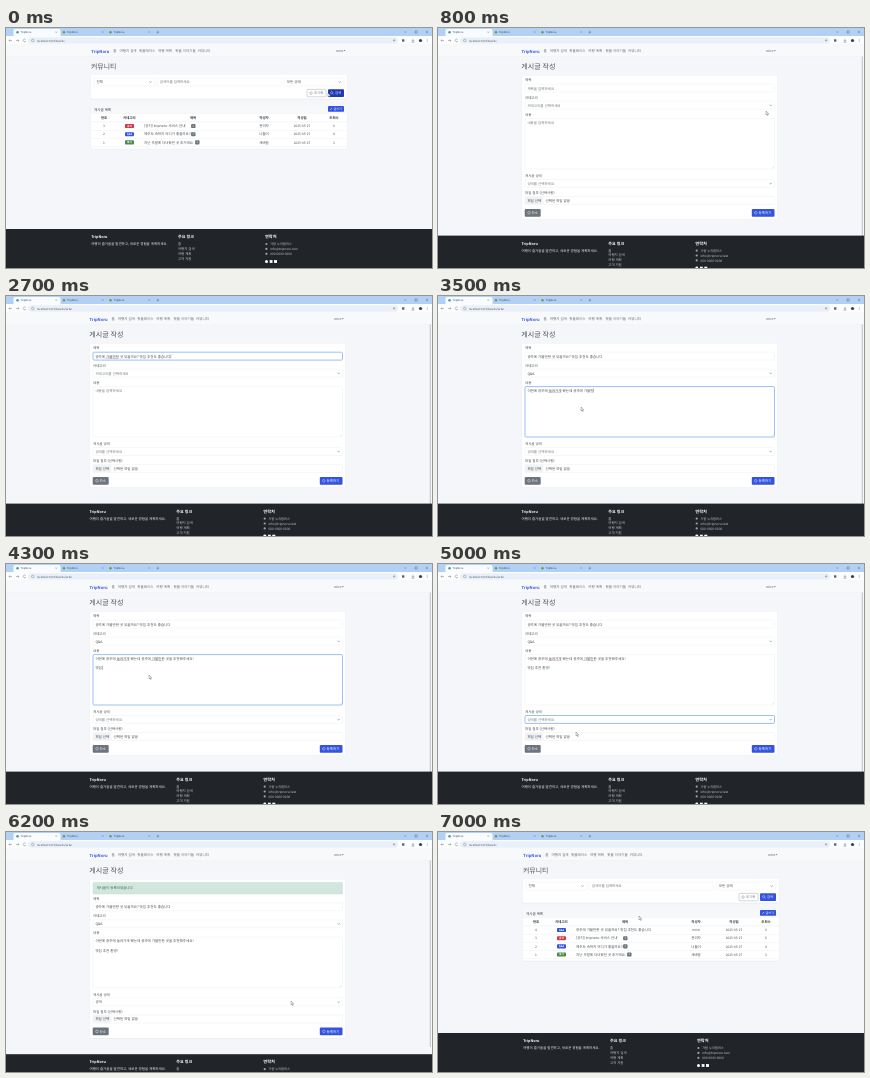
Animation, 426 px wide and 240 px high, one loop 7.1 s. Source, as an HTML page:

```html
<!DOCTYPE html>
<html lang="ko">
<head>
<meta charset="utf-8">
<title>TripNoru</title>
<style>
  html, body { margin: 0; width: 100%; height: 100%; overflow: hidden; background: #f5f6fa; }
  svg { display: block; width: 100vw; height: 100vh; }
  text { font-family: 'Noto Sans CJK KR', 'Noto Sans CJK', 'Noto Sans', sans-serif; text-rendering: geometricPrecision; white-space: pre; }
</style>
</head>
<body>
<svg id="stage" viewBox="0 0 426 240"></svg>
<script>
const LOOP = 7100, STEP = 100;
const BLUE = '#3453de', DARK_BLUE = '#2038b4', INK = '#43484d', GREY = '#6c757d', LINE = '#dfe3e8';
const BRAND = 'TripNoru';
const TITLE = '광주에 가볼만한 곳 있을까요? 맛집 추천도 좋습니다';
const BODY = '이번에 광주에 놀러가게 됐는데 광주에 가볼만한 곳을 추천해주세요!';
const BODY2 = '맛집 추천 환영!';

const rect = (x, y, w, h, fill, more = '') =>
  `<rect x="${x}" y="${y}" width="${w}" height="${h}" fill="${fill}" ${more}/>`;
const text = (x, y, str, size = 3.5, fill = INK, more = '') =>
  `<text x="${x}" y="${y}" font-size="${size}" fill="${fill}" ${more}>${str.replace(/&/g, '&amp;')}</text>`;
const path = (d, stroke, width = .4, more = '') =>
  `<path d="${d}" fill="none" stroke="${stroke}" stroke-width="${width}" ${more}/>`;
const dot = (x, y, r, fill, more = '') => `<circle cx="${x}" cy="${y}" r="${r}" fill="${fill}" ${more}/>`;
const group = (id, inner, more = '') => `<g id="${id}" ${more}>${inner}</g>`;
const MID = 'text-anchor="middle"', BOLD = 'font-weight="700"';

const card = (x, y, w, h) =>
  rect(x - .3, y, w + .6, h + .7, '#000', 'opacity=".05" rx="1.2"') + rect(x, y, w, h, '#fff', 'rx="1"');
const field = (x, y, w, h, id = '') =>
  rect(x, y, w, h, '#fff', `rx="1.1" stroke="${LINE}" stroke-width=".3" ${id && `id="${id}"`}`);
const chevron = (x, y) => path(`M${x - 1.1} ${y - .5}l1.1 1.1l1.1-1.1`, '#454b51', .45);
const lens = (x, y, color) =>
  path(`M${x + .5} ${y + .5}l1 1M${x + .8} ${y - .4}a1.1 1.1 0 1 1-2.2 0a1.1 1.1 0 1 1 2.2 0`, color);
const ring = (x, y, color) => dot(x, y, 1.3, 'none', `stroke="${color}" stroke-width=".4"`);

function browser() {
  const tab = (x, active) =>
    (active ? rect(x - 4, 1, 47, 9, '#f8fbff', 'rx="1.6"') : '') +
    dot(x, 4.2, 1.2, active ? '#4f8f86' : '#6c9b45') +
    text(x + 3, 5.3, BRAND, 2.6, '#3a4450') +
    path(`M${x + 38} 3.4l1.5 1.5m0-1.5l-1.5 1.5`, '#56606c', .3);
  return rect(0, 0, 426, 9, '#b1d0f3') + tab(11.5, true) + tab(58, false) + tab(104.5, false) +
    path('M151.8 2.9v2.6M150.5 4.2h2.6M398 4h2.4M409 2.9h2.2v2.2h-2.2zM419.9 2.9l2.2 2.2m0-2.2l-2.2 2.2', '#3f4a57', .35) +
    rect(0, 8, 426, 9, '#fcfdff') + rect(22, 9.2, 370, 6.5, '#eaf0f9', 'rx="3.2"') +
    path('M6 12.5h-3m1.2-1.2l-1.2 1.2l1.2 1.2M10 12.5h3m-1.2-1.2l1.2 1.2l-1.2 1.2M19.7 11.6a1.4 1.4 0 1 0 .2 1.4', '#596068') +
    ring(26.8, 12.5, '#646c75') +
    text(31, 13.6, 'localhost:5173/boards', 2.65, '#3d444c', 'id="url"') +
    path('M386.8 12.4h2.6M388.1 11.1v2.6', '#667') + rect(396, 11.3, 2.4, 2.4, '#5b6474') +
    path('M407 11v2.3m-1-1l1 1l1-1M405.7 14.2h2.6', '#3f4650') + dot(414.5, 12.5, 1.6, '#35404c') +
    path('M421.3 11v.5M421.3 12.3v.5M421.3 13.6v.5', '#444', .5) +
    rect(0, 16.8, 426, .3, '#dfe5ec');
}

function navbar() {
  const items = [[107.3, '홈'], [113.5, '여행지 검색'], [133, '핫플레이스'], [152, '여행 계획'], [169.3, '핫플 이야기들'], [191.7, '커뮤니티']];
  return rect(0, 17, 426, 11.5, '#f8f9fa') + rect(0, 28.4, 426, .3, '#e6e9ee') +
    group('navRow', text(85.3, 24.6, BRAND, 4.1, BLUE, BOLD) +
      items.map(([x, s]) => text(x, 24.2, s, 3.5, '#62676d')).join('') +
      text(330, 24, 'miro', 3.3, '#555b61') + `<path d="M337.5 22.2h2l-1 1.1z" fill="#555b61"/>`);
}

function footer() {
  const links = ['홈', '여행지 검색', '여행 계획', '고객 지원'];
  const contact = ['가람 누리캠퍼스', 'info@tripnoru.test', '000-0000-0000'];
  const pale = '#c5c9cd';
  return group('footer', rect(-5, 201, 436, 50, '#212529') +
    text(85.2, 210, BRAND, 3.7, '#fff', BOLD) +
    text(172, 210, '주요 링크', 4, '#fff', BOLD) + text(259, 210, '연락처', 4.2, '#fff', BOLD) +
    text(85.2, 217, '여행의 즐거움을 발견하고, 새로운 경험을 계획하세요.', 3.45, '#eceef0', 'font-weight="500"') +
    links.map((s, i) => text(172, 217 + i * 4.9, s, 3.4, pale)).join('') +
    contact.map((s, i) => dot(260.4, 216 + i * 4.9, 1.1, '#9ea4aa') + text(264.2, 217.2 + i * 4.9, s, 3.2, pale)).join('') +
    dot(260.5, 233.5, 1.5, '#fff') + rect(263.7, 232.1, 2.8, 2.8, '#fff') + rect(268, 232.1, 3, 2.8, '#fff'));
}

const posts = [
  ['Q&A', BLUE, TITLE, 'miro', 0, 0],
  ['공지', '#d63545', '[공지] tripnoru 서비스 안내', '관리자', 6, 187],
  ['Q&A', BLUE, '제주도 숙박지 어디가 좋을까요!?', '나들이', 4, 187],
  ['후기', '#4f8a49', '지난 주말에 다녀왔던 곳 후기에요.', '새바람', 3, 191]
];

function table(rows) {
  const heads = [[98, '번호'], [123.5, '카테고리'], [187, '제목'], [258, '작성자'], [296, '작성일'], [328, '조회수']];
  const row = ([kind, color, title, who, views, badge], i) => {
    const y = 98 + i * 8.15;
    return text(98, y + 1.2, `${rows.length - i}`, 3.2, INK, MID) +
      rect(119, y - 2, 9, 4.1, color, 'rx=".9"') + text(123.5, y + 1, kind, 2.6, '#fff', MID + BOLD.padStart(18)) +
      text(138, y + 1.2, title) +
      (badge ? rect(badge - 1.9, y - 2, 4.4, 4.1, GREY, 'rx=".9"') + text(badge + .3, y + 1, '2', 2.6, '#fff', MID) : '') +
      text(258, y + 1.2, who, 3.5, INK, MID) + text(296, y + 1.2, '2025-05-27', 3.2, INK, MID) +
      text(328, y + 1.2, `${views}`, 3.2, INK, MID) + rect(85, y + 4, 256, .25, LINE);
  };
  return card(85, 77, 256, 19.2 + rows.length * 8.15) + rect(85, 77, 256, 8.3, '#f7f8fa') + rect(85, 85.2, 256, .25, LINE) +
    text(88, 82.5, '게시글 목록', 3.5, '#33383d', 'font-weight="500"') +
    rect(322, 78, 16, 5.8, BLUE, 'rx=".9" class="write"') + path('M324.3 81.8l1.8-1.8', '#fff', .6) + text(327.4, 82, '글쓰기', 3.1, '#fff') +
    heads.map(([x, s]) => text(x, 91, s, 3.4, '#33383d', MID + ' ' + BOLD)).join('') +
    rect(85, 93.8, 256, .3, '#d5d9de') + rows.map(row).join('');
}

function listPage() {
  return text(85, 41.2, '커뮤니티', 6.9, '#4d5258') + card(85, 47, 256, 23.8) +
    field(88, 50, 61, 8) + text(90.6, 55.3, '전체') + chevron(144.5, 54) +
    field(151.3, 50, 124, 8) + text(153.8, 55.3, '검색어를 입력하세요', 3.5, GREY) +
    field(278, 50, 60, 8) + text(280.8, 55.3, '모든 상태') + chevron(333.7, 54) +
    rect(301, 61.4, 19, 7.4, '#fff', `rx="1" stroke="${GREY}" stroke-width=".3"`) + ring(305, 65.1, GREY) + text(308, 66.4, '초기화', 3.4, GREY) +
    rect(322, 61.3, 16, 7.6, BLUE, 'rx="1" id="search"') + lens(326, 65.1, '#fff') + text(329, 66.4, '검색', 3.4, '#fff') +
    group('before', table(posts.slice(1))) + group('after', table(posts));
}

function formPage() {
  const label = (y, s) => text(87, y, s, 3.45);
  const value = (y, id) => text(89.4, y, '', 3.5, INK, `id="${id}"`);
  const wave = (x, y, w, id) => path(`M${x} ${y}h${w}`, '#b5656a', .35, `id="${id}"`);
  const caret = id => rect(0, 0, .3, 4, '#222', `id="${id}"`);
  const fields = label(53.2, '제목') + field(87, 56.2, 249.5, 7.9, 'titleBox') + value(61.5, 'title') +
    wave(99.4, 62.3, 12.9, 'titleWave') + caret('titleCaret') +
    label(70.8, '카테고리') + field(87, 73.2, 249.5, 7.9, 'kindBox') + value(78.5, 'kind') + chevron(332.7, 77.2) +
    label(87.8, '내용') + field(87, 90.6, 249.5, 50.4, 'bodyBox') + value(95.6, 'body') + value(105, 'body2') +
    wave(110.2, 96.4, 12.8, 'wave1') + wave(144.6, 96.4, 12.8, 'wave2') + caret('bodyCaret') +
    path('M333.8 140.2l1.9-1.9M335 140.2l.7-.7', '#a5a9ad', .25) +
    label(149.2, '게시글 상태') + field(87, 151.5, 249.5, 7.9, 'stateBox') + value(156.8, 'state') + chevron(332.7, 155.5) +
    label(166, '파일 첨부 (선택사항)') + field(87, 168.5, 249.5, 7.9) + rect(87.2, 168.7, 18, 7.5, '#f0f2f4', 'rx="1"') +
    text(89.4, 173.8, '파일 선택') + text(107.5, 173.8, '선택된 파일 없음') +
    rect(86.7, 181, 16, 7.7, GREY, 'rx="1"') + ring(91, 184.8, '#fff') + text(93.6, 186.1, '취소', 3.4, '#fff') +
    rect(313.8, 181, 22.7, 7.7, BLUE, 'rx="1" id="submit"') + ring(317.8, 184.8, '#fff') + text(320.6, 186.1, '등록하기', 3.5, '#fff');
  const track = rect(422.6, 17, 3.4, 223, '#f6f7f9') + rect(423.7, 20, 1.3, 195, '#c9ccd0', 'rx=".6"');
  const notice = rect(87, 50.4, 249.5, 11.6, '#d1e7dd', 'rx="1" stroke="#a3cfbb" stroke-width=".3"') +
    text(90.4, 57.4, '게시글이 등록되었습니다.', 3.5, '#35594a');
  return text(83.3, 41.2, '게시글 작성', 7, '#4d5258') +
    group('cardShort', card(83.8, 47.4, 255.6, 144)) + group('cardTall', card(83.8, 47.4, 255.6, 158.6)) +
    group('notice', notice) + group('fields', fields) + track;
}

const stage = document.getElementById('stage');
stage.innerHTML = rect(0, 0, 426, 240, '#f5f6fa') + group('list', listPage()) + group('form', formPage()) +
  footer() + navbar() + browser() +
  group('pointer', '<path d="M0 0v3.8l.9-.8l.7 1.5l.6-.3l-.7-1.4h1.2z" fill="#fff" stroke="#222" stroke-width=".3"/>');

const el = {};
stage.querySelectorAll('[id]').forEach(n => el[n.id] = n);
const show = (id, on) => el[id].setAttribute('display', on ? 'inline' : 'none');
const move = (id, x, y) => el[id].setAttribute('transform', `translate(${x} ${y})`);
const paint = (id, fill) => el[id].setAttribute('fill', fill);
const put = (id, str, hint) => {
  el[id].textContent = str || hint;
  paint(id, str ? INK : '#6f767d');
};
const focus = (id, on) => {
  el[id].setAttribute('stroke', on ? '#7fb2f0' : LINE);
  el[id].setAttribute('stroke-width', on ? .8 : .3);
};

// stops: [time, value, ...]; values are interpolated between neighbours
function along(stops, t) {
  const i = stops.findIndex(s => s[0] > t);
  if (i < 0) return stops[stops.length - 1].slice(1);
  if (i === 0) return stops[0].slice(1);
  const a = stops[i - 1], b = stops[i], k = (t - a[0]) / (b[0] - a[0]);
  return a.slice(1).map((v, j) => v + (b[j + 1] - v) * k);
}
const typed = (str, stops, t) => str.slice(0, Math.round(along(stops, t)[0]));

const titleKeys = [[1200, 0], [1600, 9], [1800, 9], [2600, TITLE.length]];
const bodyKeys = [[3000, 0], [3500, 24], [4100, BODY.length]];
const body2Keys = [[4200, 0], [4600, BODY2.length]];
const route = [
  [0, 322, 65], [300, 328, 80], [800, 328, 83], [900, 328, 83], [1200, 150, 60], [2600, 150, 60],
  [2900, 140, 77], [3100, 143, 111], [4600, 143, 111], [4800, 138, 156], [5000, 138, 168],
  [5200, 138, 160], [5600, 324, 184], [5900, 324, 184], [6200, 285, 169], [6600, 212, 100], [7000, 201, 84]
];

function placeCaret(id, node, on) {
  show(id, on);
  if (!on) return;
  const len = node.getComputedTextLength();
  move(id, 89.6 + len, +node.getAttribute('y') - 3.2);
}

function render(t) {
  const form = t >= 500 && t < 6400, done = t >= 5900;
  const drop = form && done ? 14.6 : 0;
  const inTitle = t >= 1200 && t < 2800, inBody = t >= 3000 && t < 4800;

  show('form', form);
  show('list', !form);
  show('before', t < 500);
  show('after', t >= 6400);
  paint('search', t < 200 ? DARK_BLUE : BLUE);
  el.url.textContent = 'localhost:5173/boards' + (t >= 900 && form ? '/write' : '');
  move('navRow', form ? -1.7 : 0, 0);
  move('footer', form ? -1.7 : 0, form ? 6.6 + drop : 0);
  move('fields', 0, drop);
  show('notice', done);
  show('cardTall', done);
  show('cardShort', !done);

  if (form) {
    const title = typed(TITLE, titleKeys, t), body = typed(BODY, bodyKeys, t), body2 = typed(BODY2, body2Keys, t);
    put('title', title, '제목을 입력하세요');
    put('kind', t >= 2900 ? 'Q&A' : '', '카테고리를 선택하세요');
    put('body', body, '내용을 입력하세요');
    put('body2', body2, '');
    put('state', t >= 5200 ? '공개' : '', '상태를 선택하세요');
    focus('titleBox', inTitle);
    focus('kindBox', t >= 2800 && t < 3000);
    focus('bodyBox', inBody);
    focus('stateBox', t >= 4800 && t < 5700);
    show('titleWave', inTitle && title.length > 7);
    show('wave1', body.length > 11 && !done);
    show('wave2', body.length > 24 && !done);
    placeCaret('titleCaret', el.title, inTitle && title.length > 0);
    placeCaret('bodyCaret', body2 ? el.body2 : el.body, inBody && body.length > 0);
    paint('submit', t >= 5600 && !done ? DARK_BLUE : BLUE);
  }

  move('pointer', ...along(route, t));
  show('pointer', t < 1300 || t > 2700);
}

function tick() {
  render(Math.floor(performance.now() % LOOP / STEP) * STEP);
  requestAnimationFrame(tick);
}
tick();
</script>
</body>
</html>
```
